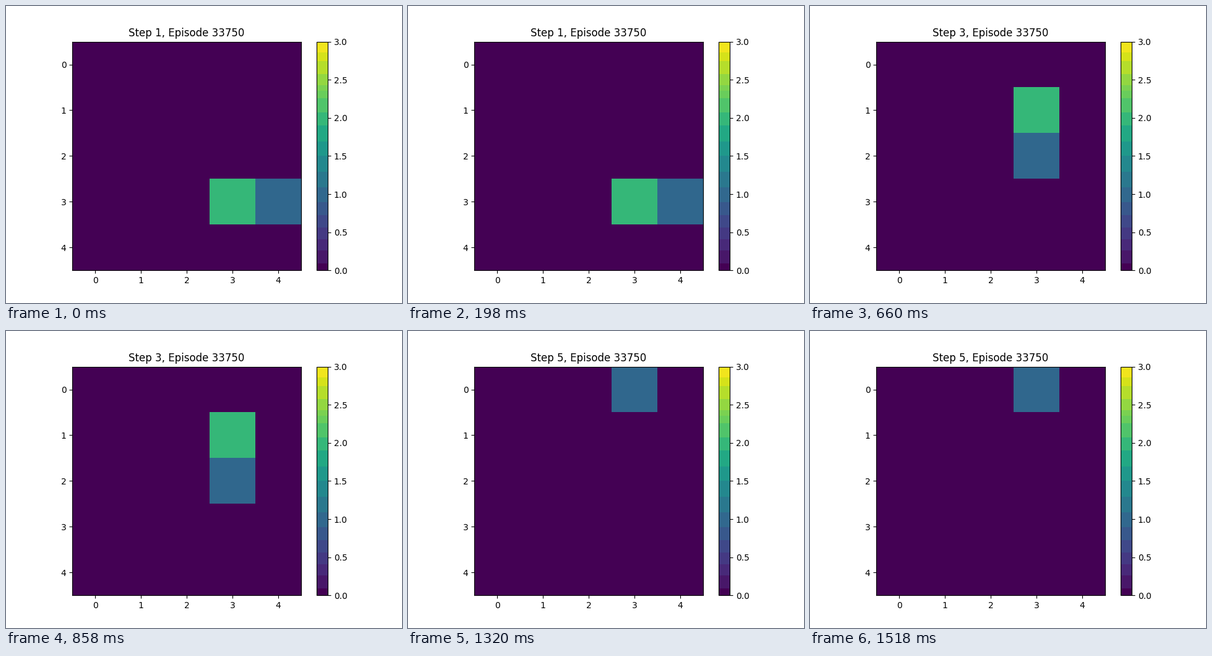
A matplotlib script that plays this animation: 640 by 480 pixels, repeating every 1.65 s.

```python
import numpy as np
import matplotlib.pyplot as plt
from matplotlib.animation import FuncAnimation
from matplotlib.colors import ListedColormap

SIZE = 5
STEPS = 5
EPISODE = 33750
COL = 3
START_ROW = 3
BODY, HEAD = 1, 2

# Viridis reduced to uneven flat bands
CUTS = [0, 8, 22, 35, 48, 62, 76, 93, 110, 128, 144, 162, 177,
        193, 201, 207, 220, 234, 244, 256]


def banded_viridis():
    base = plt.get_cmap("viridis")
    colors = []
    for a, b in zip(CUTS, CUTS[1:]):
        shade = (a + b + 1) // 2 if a else 0
        colors += [base(shade)] * (b - a)
    return ListedColormap(colors)


def grid(step):
    """The head climbs one row per step and the body follows it."""
    cells = np.zeros((SIZE, SIZE))
    head = (START_ROW - step, COL)
    body = (START_ROW - step + 1, COL) if step else (START_ROW, COL + 1)
    for (row, col), value in ((body, BODY), (head, HEAD)):
        if 0 <= row < SIZE:
            cells[row, col] = value
    return cells


fig, ax = plt.subplots(figsize=(6.4, 4.8), dpi=100)
image = ax.imshow(grid(0), cmap=banded_viridis(), vmin=0, vmax=3,
                  interpolation="nearest")
fig.colorbar(image, ax=ax)
title = ax.set_title("")


def update(step):
    image.set_data(grid(step))
    title.set_text(f"Step {step + 1}, Episode {EPISODE}")
    return image, title


anim = FuncAnimation(fig, update, frames=STEPS, interval=330,
                     repeat=True, repeat_delay=0)
plt.show()
```
